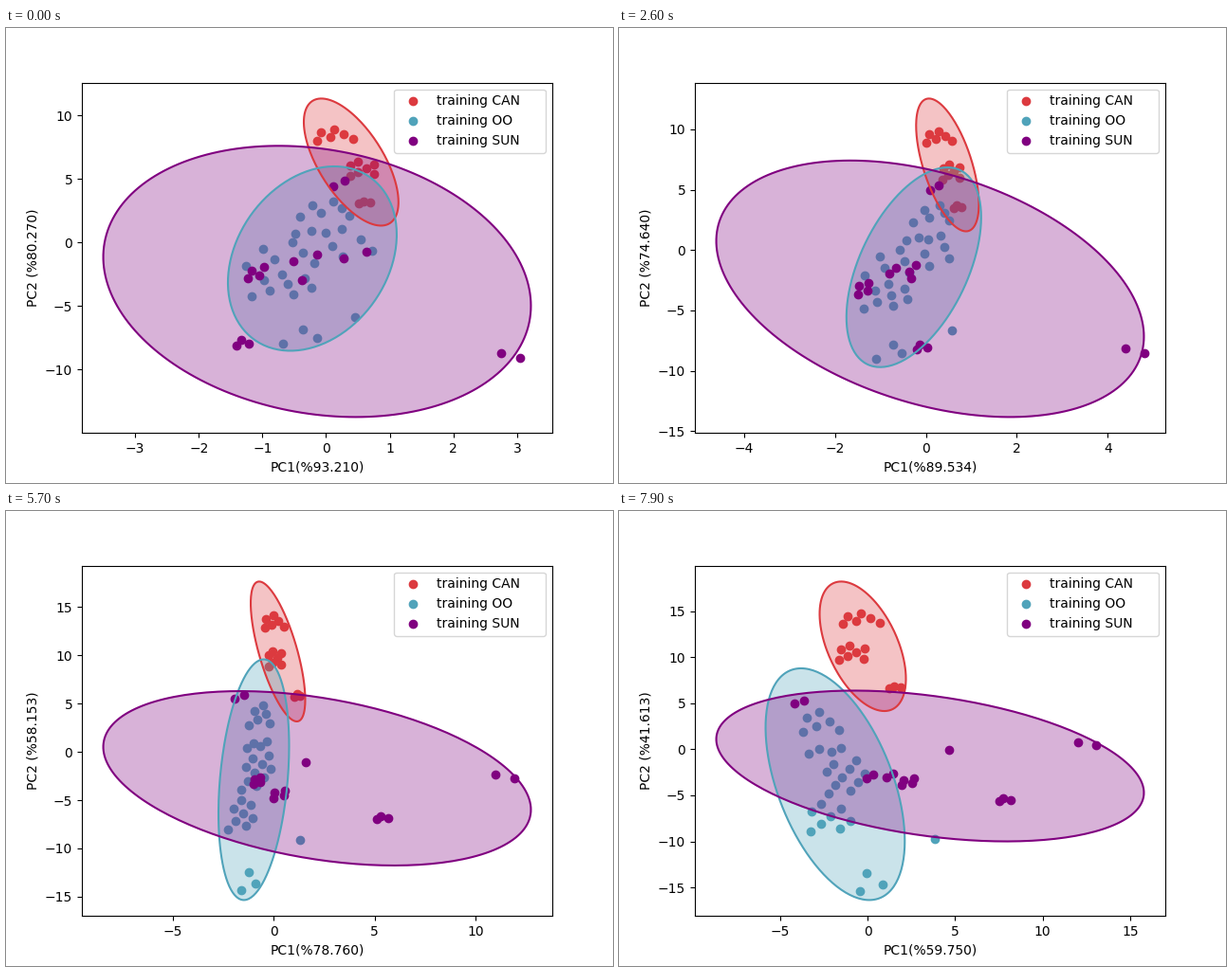
A matplotlib script that plays this animation: 640 by 480 pixels, repeating every 8 s.

```python
import numpy as np
import matplotlib.pyplot as plt
from matplotlib.animation import FuncAnimation

FRAMES, INTERVAL = 80, 100
FRAME = np.arange(FRAMES)
GOLDEN = (5 ** .5 - 1) / 2
THETA = np.linspace(0, 2 * np.pi, 200)

RING_KEYS = [0, 17, 35, 57, 70, 79]
DOT_KEYS = [17, 35, 57, 79]
TEXT_KEYS = [0, 17, 35, 46, 57, 70, 79]
OPENING = np.array([.986, .986, .997, .997, 1])  # slight growth at first

PC1 = [93.210, 93.525, 84.344, 82.258, 78.760, 62.389, 59.750]
PC2 = [80.270, 80.377, 66.736, 62.692, 58.153, 45.039, 41.613]


def monotone(keys, values):
    """Monotone cubic through the keys, evaluated at every frame."""
    t = np.array(keys, float)
    y = np.array(values, float).reshape(len(t), -1)
    h = np.diff(t)[:, None]
    d = np.diff(y, axis=0) / h
    w1, w2 = 2 * h[1:] + h[:-1], h[1:] + 2 * h[:-1]
    same = d[:-1] * d[1:] > 0
    a, b = np.where(same, d[:-1], 1), np.where(same, d[1:], 1)
    inner = np.where(same, (w1 + w2) / (w1 / a + w2 / b), 0)
    m = np.vstack([d[:1], inner, d[-1:]])
    at = np.clip(FRAME, t[0], t[-1])
    k = np.clip(np.searchsorted(t, at, "right") - 1, 0, len(h) - 1)
    s, hk = (at - t[k])[:, None] / h[k], h[k]
    return ((1 + 2 * s) * (1 - s) ** 2 * y[k]
            + s * (1 - s) ** 2 * hk * m[k]
            + s ** 2 * (3 - 2 * s) * y[k + 1]
            - s ** 2 * (1 - s) * hk * m[k + 1])


def ring(*rows):
    """Path of an ellipse: x0, x1, y0, y1 and correlation at each key."""
    return monotone(RING_KEYS, [rows[0] * OPENING, *rows])


def path(value):
    """A constant, or values at the dot keys."""
    return monotone(DOT_KEYS, np.broadcast_to(value, len(DOT_KEYS)))


def clump(count, side, level, width=0, depth=0):
    """Dots spread evenly across and by golden steps in height."""
    k = np.arange(count)
    across = np.linspace(-1, 1, count) if count > 1 else np.zeros(1)
    up = 2 * (k * GOLDEN % 1) - 1 if count > 1 else np.zeros(1)
    return np.stack([path(side) + path(width) * across,
                     path(level) + depth * up])


# Clumps live in the frame of their ring: sideways offset and height
GROUPS = [
    ("CAN", "#dc3a3f",
     ring([-.355, 1.153, 1.33, 11.35, -.63],
          [-.075, 1.188, 1.96, 14.425, -.55],
          [-1.141, 1.562, 3.16, 17.66, -.69],
          [-1.582, 1.606, 3.77, 17.985, -.65],
          [-2.746, 2.184, 4.16, 18.23, -.5]),
     [clump(6, (-.16, 0, .14, .155), .44, .5, .1),
      clump(7, (.2, -.08, -.27, -.36), -.085, .4, .13),
      clump(3, (-.16, .03, .38, .49), -.62, .15, .03)]),
    ("OO", "#50a3ba",
     ring([-1.564, 1.125, -8.535, 6.0, .26],
          [-2.051, 1.299, -11.59, 8.06, .74],
          [-2.74, .763, -15.35, 9.59, .28],
          [-3.606, .948, -16.01, 9.44, -.18],
          [-5.834, 2.119, -16.37, 8.80, -.49]),
     [clump(6, .03, .55, .3, .1),
      clump(4, 0, .295, .28, .03),
      clump(10, (-.045, -.16, .06, .19), .07, (.75, .6, .4, .35), .15),
      clump(8, -.28, -.27, .35, .14),
      clump(3, .09, -.8, .2, .12),
      clump(1, (.69, 1.27, 1.5, 1.38), (-.63, -.63, -.5, -.477))]),
    ("SUN", "purple",
     ring([-3.55, 3.263, -13.76, 7.62, -.18],
          [-6.195, 7.368, -13.86, 7.05, -.565],
          [-8.452, 12.752, -11.77, 6.30, -.36],
          [-8.641, 14.181, -11.13, 6.50, -.355],
          [-8.651, 15.782, -10.0, 6.38, -.355]),
     [clump(2, (.82, .86, .95, .9), (-.56, -.41, .01, .29), .04, -.03),
      clump(3, (-.44, -.05, .15, .2), -.44, .03, .03),
      clump(2, (.235, .4, -.03, -.335), (.735, .855, .945, .855), .03, .03),
      clump(1, (-.07, -.05, .015, .175), (.01, .14, .185, .21)),
      clump(4, (.095, -.21, -.31, -.3), (.19, .12, -.02, -.126),
            (.18, .02, .03, .08), .04),
      clump(4, (-.28, -.37, -.26, -.19), (.07, -.05, -.174, -.2),
            .045, .05)]),
]
PERCENT = monotone(TEXT_KEYS, np.column_stack([PC1, PC2]))

fig, ax = plt.subplots(figsize=(6.4, 4.8), dpi=100)


def outline(cx, cy, w, h, rho):
    return cx + w * np.cos(THETA), cy + h * np.sin(THETA + np.arcsin(rho))


def place(dots, cx, cy, w, h, rho):
    side, level = dots
    u = rho * level + np.sqrt(1 - rho ** 2) * side
    return cx + w * u, cy + h * level


def padded(lo, hi):
    pad = .05 * (hi - lo)
    return lo - pad, hi + pad


def draw(i):
    ax.clear()
    for name, color, rings, clumps in GROUPS:
        x0, x1, y0, y1, rho = rings[i]
        shape = (x0 + x1) / 2, (y0 + y1) / 2, (x1 - x0) / 2, (y1 - y0) / 2, rho
        dots = np.concatenate([c[:, i] for c in clumps], axis=1)
        ax.scatter(*place(dots, *shape), color=color,
                   label=f"training {name}     ")
        x, y = outline(*shape)
        ax.fill(x, y, color=color, alpha=.3, lw=0)
        ax.plot(x, y, color=color, lw=1.5, solid_capstyle="butt")
    x0, x1, y0, y1, _ = np.array([g[2][i] for g in GROUPS]).T
    ax.set_xlim(*padded(x0.min(), x1.max()))
    ax.set_ylim(*padded(y0.min(), y1.max()))
    ax.set_xlabel(f"PC1(%{PERCENT[i, 0]:.3f})")
    ax.set_ylabel(f"PC2 (%{PERCENT[i, 1]:.3f})")
    ax.legend(loc="upper right")


anim = FuncAnimation(fig, draw, frames=FRAMES, interval=INTERVAL,
                     init_func=lambda: None, repeat=True, repeat_delay=0)
plt.show()
```
